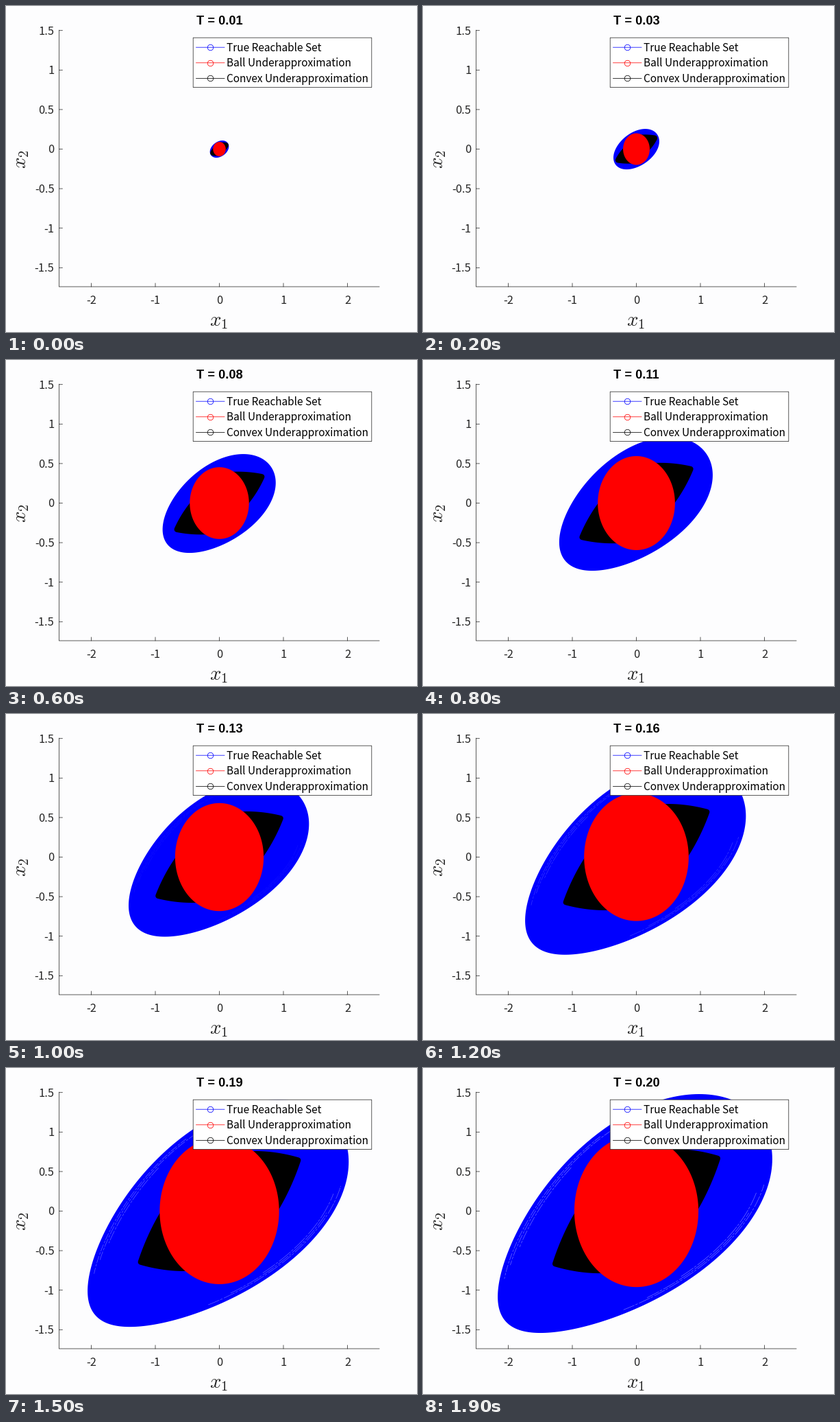
Write a matplotlib script that moves like this. It is 600 by 475 pixels and loops after 2000 ms.

```python
import numpy as np
import matplotlib.pyplot as plt
from matplotlib.animation import FuncAnimation
from matplotlib.patches import Polygon, Rectangle

W, H, DPI = 600, 475, 100
FRAMES, INTERVAL = 20, 100
X0, Y0 = 311.5, 208.5        # pixel position of the data origin
SX, SY = 93.5, 115.2         # pixels per data unit
LEFT, RIGHT, TOP, BOTTOM = 77.4, 545, 35.2, 409
INK = "#262626"
PX = 72 / DPI                # points per pixel
THIN = 0.75 * PX

plt.rcParams["font.family"] = "Noto Sans CJK JP"
plt.rcParams["mathtext.fontset"] = "cm"

fig = plt.figure(figsize=(W / DPI, H / DPI), dpi=DPI, facecolor="#fdfdfe")
ax = fig.add_axes([0, 0, 1, 1])
ax.set_xlim(0, W)
ax.set_ylim(H, 0)
ax.axis("off")


def line(xs, ys, color=INK, **kw):
    return ax.plot(xs, ys, color=color, lw=THIN, snap=False, **kw)[0]


def label(x, y, s, size, **kw):
    kw = {"va": "baseline", "color": INK, **kw}
    return ax.text(x, y, s, fontsize=size * PX, **kw)


def to_px(x, y):
    return np.column_stack([X0 + SX * np.asarray(x), Y0 - SY * np.asarray(y)])


def bezier(p, c, q, n=20):
    s = np.linspace(0, 1, n)[:, None]
    p, c, q = map(np.array, (p, c, q))
    return (1 - s) ** 2 * p + 2 * s * (1 - s) * c + s ** 2 * q


def true_set(t, theta, scale=1.0):
    """Sheared ellipse, bent by terms that grow with t squared."""
    phi = np.arccos(0.44 + 0.75 * t)
    bend = t * t
    x = 982 * t * np.cos(theta) * scale - bend * (50 + 850 * np.sin(theta) ** 2)
    y = 850 * t * np.cos(theta - phi) * scale - bend * (88 + 800 * np.sin(theta - phi) ** 2)
    return np.column_stack([X0 + x, Y0 - y])


def ball_radius(t):
    return t * (5.65 - 5.1 * t)


def ball(t):
    r = ball_radius(t)
    return to_px(r * np.cos(THETA), r * np.sin(THETA))


def convex_set(t):
    a, b = t / (0.096 + 0.3086 * t), t / (0.2 + 0.5 * t)
    top = t / (0.19 + 0.38 * t)
    side = 0.97 * ball_radius(t)
    right = bezier((side, 0), (side + 0.61 * (a - side), 0.46 * b), (a, b))
    upper = bezier((a, b), (0.72 * a, top), (0.45 * a, top))
    half = np.vstack([right, upper, [(0, top)]])
    pts = np.vstack([half, -half])
    return to_px(pts[:, 0], pts[:, 1])


THETA = np.linspace(0, 2 * np.pi, 240, endpoint=False)


def blob(color, z):
    # The wide round outline stands for the swept circle markers.
    p = Polygon([(0, 0), (1, 0), (0, 1)], closed=True, fc=color, ec=color,
                lw=8 * PX, joinstyle="round", zorder=z)
    return ax.add_patch(p)


blue = blob("#0000ff", 2)
black = blob("#000000", 4)
red = blob("#ff0000", 5)

# Faint gaps between sampled curves near the rim: scale, from, to (degrees)
GAPS = [(0.985, 95, 168), (0.965, 85, 160), (0.94, 110, 150),
        (0.988, -85, -12), (0.968, -75, -25), (0.945, -60, -15)]
gaps = [line([], [], "#ffffff", zorder=3, dashes=(14 + 3 * i, 2, 5, 3))
        for i in range(len(GAPS))]

# Axes
line([LEFT, LEFT, RIGHT], [TOP, BOTTOM, BOTTOM], zorder=1)
for v in (-2, -1, 0, 1, 2):
    x = X0 + SX * v
    line([x, x], [BOTTOM, BOTTOM - 5], zorder=1)
    label(x, 434.3, str(v), 16.5, ha="center")
for v in (-1.5, -1, -0.5, 0, 0.5, 1, 1.5):
    y = Y0 - SY * v
    line([LEFT, LEFT + 5], [y, y], zorder=1)
    label(70.5, y + 6, f"{v:g}", 16.5, ha="right")
label(311, 466.5, "$x_1$", 29, ha="center")
label(36, 223, "$x_2$", 29, ha="right", va="center", rotation=90)
title = label(311.5, 27, "", 18.3, ha="center", color="black",
              weight="bold", family="Liberation Sans")

# Legend
ax.add_patch(Rectangle((273.2, 46.2), 260.6, 72.4, fc="white", ec=INK,
                       lw=THIN, snap=False, zorder=6))
ENTRIES = [("True Reachable Set", "#0000ff"),
           ("Ball Underapproximation", "#ff0000"),
           ("Convex Underapproximation", "#000000")]
for i, (name, color) in enumerate(ENTRIES):
    y = 60.2 + 22.6 * i
    line([277.5, 319], [y, y], color, zorder=7)
    line([298.2], [y], color, marker="o", ms=8.5 * PX, mfc="none",
         mew=THIN, zorder=7)
    label(322, y + 5.6, name, 15.45, color="black", zorder=7)


def update(k):
    step = min(1 + int(1.25 * k), 20)
    t = step / 100
    title.set_text(f"T = {t:.2f}")
    blue.set_xy(true_set(t, THETA))
    black.set_xy(convex_set(t))
    red.set_xy(ball(t))
    fade = 0.4 * max(0, (t - 0.12) / 0.08)
    for g, (scale, lo, hi) in zip(gaps, GAPS):
        arc = np.radians(np.linspace(lo, hi, 60))
        g.set_data(*true_set(t, arc, scale).T)
        g.set_alpha(fade)
    return [title, blue, black, red, *gaps]


anim = FuncAnimation(fig, update, frames=FRAMES, interval=INTERVAL,
                     repeat=True, repeat_delay=0, blit=False)
plt.show()
```
